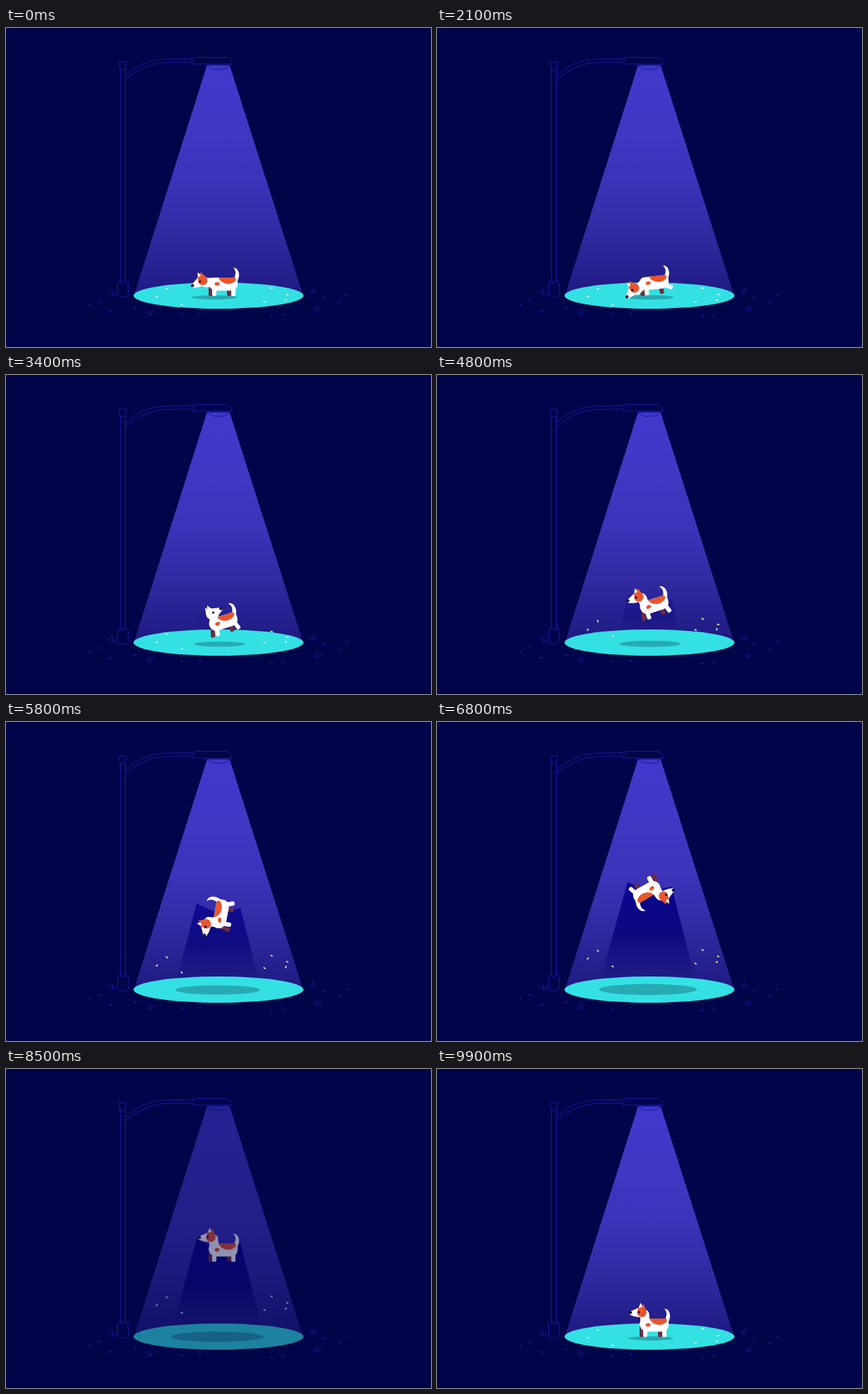
These frames come from a looping animation (600x450 px, 10000 ms). An HTML page with a canvas:

```html
<!DOCTYPE html>
<html lang="en">
<head>
<meta charset="utf-8">
<title>Dog under a street lamp</title>
<style>
html, body { margin: 0; width: 100%; height: 100%; overflow: hidden; background: #000549; }
canvas { display: block; }
</style>
</head>
<body>
<canvas id="stage" width="600" height="450"></canvas>
<script>
const ctx = document.getElementById('stage').getContext('2d');
const LOOP = 10000, STEP = 100, GROUND = 360;
const NIGHT = '#000549', LINE = '#1818a4', WHITE = '#fff', ORANGE = '#e9562a';
const MAROON = '#6d2c46', INK = '#0c0838';

const rad = deg => deg * Math.PI / 180;
const part = (t, from, to) => Math.min(1, Math.max(0, (t - from) / (to - from)));
function ramp(t, from, to) {
  const u = part(t, from, to);
  return u * u * (3 - 2 * u);
}
const pulse = (t, a, b, c, d) => ramp(t, a, b) - ramp(t, c, d);

// The dog sniffs about, looks up, floats in a somersault, then drops back.
function pose(t) {
  const sniff = pulse(t, 0, 400, 2600, 3000);
  const down = 1 - pulse(t, 2600, 3000, 9900, 10000);
  const look = pulse(t, 2800, 3200, 3900, 4200);
  const fallen = part(t, 8500, 8800) ** 2;
  const float = 16 * ramp(t, 2900, 3600) + 104 * ramp(t, 4000, 6800) - 14 * ramp(t, 7000, 8300);
  const bounce = 5 * Math.sin(Math.PI * part(t, 8800, 9000));
  const stride = (t - 2100) / 840 * 2 * Math.PI;
  return {
    sniff, stride,
    swing: 20 * Math.sin(stride),
    air: pulse(t, 3000, 3400, 7800, 8400),
    x: 307 - 11 * pulse(t, 5000, 6800, 7000, 8400),
    lift: float * (1 - fallen) + bounce + 2 * sniff,
    turn: -6 * sniff - 18 * ramp(t, 2900, 3400) - 342 * ramp(t, 4800, 8500),
    headX: -18 - 12 * down + 4 * look,
    headY: -18 + 13 * down + 10 * sniff + 2 * look,
    headTurn: -25 * down - 17 * sniff - 13 * look,
    headSide: 1 - 2 * look,
    shadowX: 302 - 8 * (1 - ramp(t, 0, 600))
  };
}

function shape(path, color) {
  ctx.fillStyle = color;
  ctx.fill(new Path2D(path));
}
function outline(path, color = LINE, width = 1) {
  ctx.lineCap = 'round';
  ctx.strokeStyle = color;
  ctx.lineWidth = width;
  ctx.stroke(new Path2D(path));
}
function oval(x, y, rx, ry, color, angle = 0) {
  ctx.fillStyle = color;
  ctx.beginPath();
  ctx.ellipse(x, y, rx, ry, angle, 0, 7);
  ctx.fill();
}
function fade(y0, y1, ...colors) {
  const g = ctx.createLinearGradient(0, y0, 0, y1);
  colors.forEach((color, i) => g.addColorStop(i / (colors.length - 1), color));
  return g;
}
function cover(alpha) {
  ctx.globalAlpha = alpha;
  ctx.fillStyle = NIGHT;
  ctx.fillRect(0, 0, 600, 450);
  ctx.globalAlpha = 1;
}

function drawBeam() {
  shape('M284 52H315.5L419 376H181Z', fade(53, 376, '#4139cd', '#4037c4', '#3c33ba', '#3029a0', '#1e1a82'));
  outline('M284 52Q288 58 294 58H306Q312 58 316 52', '#15159a');
}

function drawShade({ lift, shadowX }) {
  const y = GROUND - lift, rx = 32 + lift * 0.31, cx = shadowX - lift * 0.035;
  if (lift > 5) {
    ctx.globalAlpha = Math.min(1, lift / 105);
    shape(`M269 ${y - 14}L300 ${y}L331 ${y - 8}L${cx + rx} 371H${cx - rx}Z`,
      fade(y - 14, 371, 'rgba(8,3,142,1)', 'rgba(5,3,122,.85)', 'rgba(12,8,112,0)'));
    ctx.globalAlpha = 1;
  }
  oval(300, 377.5, 120, 18.5, '#33e1e3');
  oval(cx, 380 - lift * 0.022, rx, 3 + lift * 0.04, '#28aab2');
}

const flecks = [[213, 379], [227, 368], [248, 390], [375, 367], [397, 376], [395, 384], [365, 386]];

function drawFlecks(t) {
  const rise = 46 * pulse(t, 2900, 7100, 8500, 8900);
  const stir = pulse(t, 2900, 3400, 4800, 6800);
  flecks.forEach(([x, y], i) => {
    const tilt = (i % 5 ? 35 : -45) * Math.min(1, rise / 4) + 30 * stir * Math.sin(i);
    oval(x, y - rise - 1.1 * i * stir, 2, 0.9, '#d8fbff', rad(tilt));
  });
}

function drawLeg(x, angle, color) {
  ctx.save();
  ctx.translate(x, 6);
  ctx.rotate(rad(angle));
  ctx.fillStyle = color;
  ctx.beginPath();
  ctx.roundRect(-3, -4, 6, 16, 2);
  ctx.fill();
  ctx.restore();
}

function drawHead(dog) {
  const patch = dog.headSide > 0 ? ORANGE : WHITE;
  ctx.save();
  ctx.translate(dog.headX, dog.headY + dog.sniff * dog.swing * 0.06);
  ctx.rotate(rad(dog.headTurn));
  ctx.scale(dog.headSide, 1);
  shape('M-5 -4L-1.5 -12L3 -4Z', WHITE);
  shape('M-5 -5L-16 0Q-19 3 -16 5Q-10 8 -4 8Q7 9 7 2Q6 -7 -5 -5Z', WHITE);
  shape('M-1 -4L2.5 -11L6 -2Z', patch);
  shape('M-5 -5Q5 -8 7 1Q6 8 0 8Q-6 7 -6.5 2Z', patch);
  oval(-4, 1, 1.6, 1.6, INK);
  oval(-16, 1.8, 2.3, 2, INK);
  ctx.restore();
}

function drawDog(dog) {
  const { sniff, swing, air } = dog;
  ctx.save();
  ctx.translate(dog.x, GROUND - dog.lift);
  ctx.rotate(rad(dog.turn));
  drawLeg(-18, sniff * (3 - swing) + air * 15, MAROON);
  drawLeg(8, sniff * (swing - 6), MAROON);
  shape('M13 -5Q21 -14 14 -22Q22 -21 22 -11Q21 -3 17 1Z', WHITE);
  drawLeg(14, sniff * (-30 - 35 * Math.cos(dog.stride)) - air * 20, WHITE);
  drawLeg(-13, sniff * (swing - 6), WHITE);
  outline(`M-13 -1L${dog.headX + 4} ${dog.headY + 4}`, WHITE, 13);
  shape('M-13 -8H15Q21 -7 20 2Q19 10 10 10.5H-10Q-21 9 -21 -1Q-20 -8 -13 -8Z', WHITE);
  shape('M-7 -8H16.5Q18 -7 17.5 -4Q14 1 6 1Q-4 0 -7 -8Z', ORANGE);
  oval(-9, 1, 3.6, 2.5, ORANGE, -0.15);
  drawHead(dog);
  ctx.restore();
}

function drawTuft(x, y, lean) {
  for (let i = -1; i <= 1; i++) {
    const tip = x + i * 5 + lean;
    outline(`M${x + i * 2} ${y}Q${x + i * 2} ${y - 4} ${tip} ${y - 8 + 3 * Math.abs(i)}`);
  }
}

function drawStreet() {
  outline('M161.5 59V357M168.5 59V357M160 48H170L168.5 59H161.5Z');
  outline('M157.5 376V361Q158 356 162 356V359H168V356Q172 356 172.5 361V376Q171 379.5 165 379.5Q159 379.5 157.5 376Z');
  outline('M168.5 68Q190 46 222 44L264 43.5M168.5 73Q194 51 224 48.5L262 48');
  const lamp = 'M262 50.5L266 41.5H311Q319 43 319 50.5Z';
  shape(lamp, NIGHT);
  outline(lamp);
  outline('M281 50.5L284 53H316L318 50.5');
  drawTuft(151, 377, -2);
  drawTuft(203, 405, 0);
  drawTuft(433, 374, 1);
  drawTuft(439, 399, 2);
  outline('M117 390h2M130 385h2M146 399h3M181 395h2M247 404h2M273 403h2M374 407h2M390 405h2M447 380h2M469 387h2M480 377h2', '#1c1cae', 1.5);
}

function draw(t) {
  const dog = pose(t);
  cover(1);
  drawBeam();
  drawShade(dog);
  drawFlecks(t);
  drawDog(dog);
  // The lamp falters just before the drop.
  cover(0.68 * pulse(t, 8200, 8700, 8600, 8800));
  drawStreet();
}

const start = performance.now();
function tick() {
  const t = (performance.now() - start) % LOOP;
  draw(Math.floor(t / STEP) * STEP);
  requestAnimationFrame(tick);
}
tick();
</script>
</body>
</html>
```
